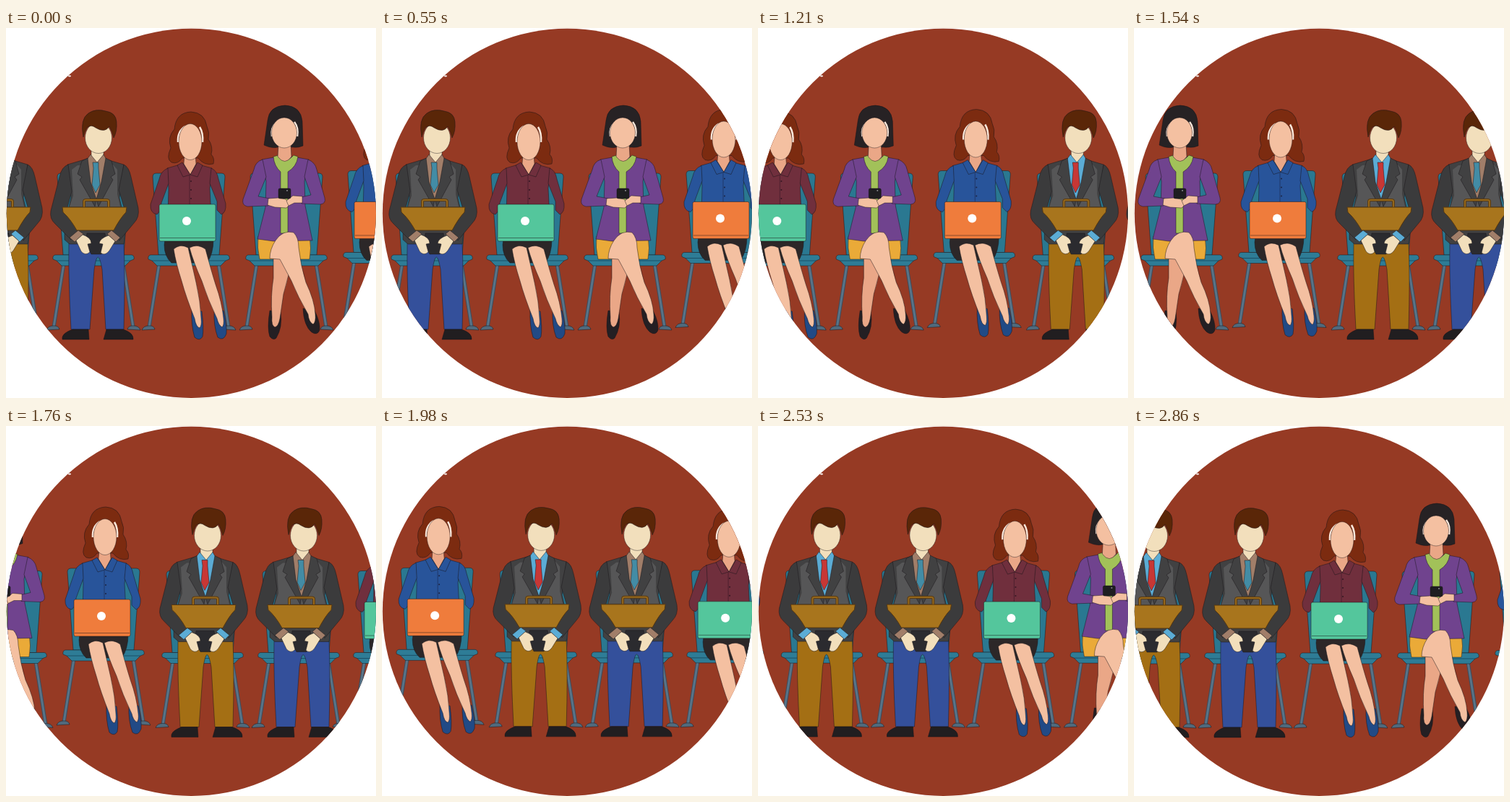
Recreate the animation shown at these times as an HTML page with a canvas. Size 512 by 512 pixels, loop 2970 ms.

```html
<!DOCTYPE html>
<html lang="en">
<head>
<meta charset="utf-8">
<title>Waiting room</title>
<style>
html, body { margin: 0; width: 100%; height: 100%; overflow: hidden; background: #fff; }
canvas { display: block; width: 512px; height: 512px; }
</style>
</head>
<body>
<canvas id="stage" width="512" height="512"></canvas>
<script>
const ctx = document.getElementById('stage').getContext('2d');

const LOOP = 2970, STEP = 110, HOLD_STEPS = 2, ROW_WIDTH = 672;
// [step, distance travelled to the left, vertical drift]
const KEYS = [[0, 0, 0], [3, 52, 0], [7, 161, 0], [12, 322, 0], [14, 388, -0.5], [18, 501, -1.5], [24, 639, 0]];
const LINE = 'rgba(25,20,25,.6)';
const SKIN = '#f4c0a1', SHADE = '#eaa787', PALE = '#f2dfbc', EAR = '#fbe9dc';

function shape(fill, d, line = LINE, width = 0.8) {
  const path = new Path2D(d);
  if (fill) { ctx.fillStyle = fill; ctx.fill(path); }
  if (line) { ctx.strokeStyle = line; ctx.lineWidth = width; ctx.stroke(path); }
}

function oval(fill, x, y, rx, ry, line = LINE) {
  ctx.beginPath();
  ctx.ellipse(x, y, rx, ry, 0, 0, Math.PI * 2);
  ctx.fillStyle = fill;
  ctx.fill();
  if (line) { ctx.strokeStyle = line; ctx.lineWidth = 0.7; ctx.stroke(); }
}

function box(fill, x, y, w, h, r, line = LINE) {
  ctx.beginPath();
  ctx.roundRect(x, y, w, h, r);
  ctx.fillStyle = fill;
  ctx.fill();
  if (line) { ctx.strokeStyle = line; ctx.lineWidth = 0.8; ctx.stroke(); }
}

function chair(cx) {
  ctx.save();
  ctx.translate(cx, 0);
  for (const side of [-1, 1]) {
    ctx.save();
    ctx.scale(side, 1);
    shape(null, 'M41 326 L55 414', '#3d4c5c', 5);
    shape(null, 'M41 326 L55 414', '#587488', 3);
    shape('#506a7d', 'M47 417 Q48 412 55 412 Q63 412 65 418 Z');
    ctx.restore();
  }
  shape('#2a7891', 'M-50 206 Q-50 201 -45 201 L45 201 Q50 201 50 206 L42 314 L-42 314 Z');
  shape('#2e7c96', 'M-53 314 L53 314 Q57 315 56 320 L51 322 L44 329 L-44 329 L-51 322 L-56 320 Q-57 315 -53 314 Z');
  shape(null, 'M-51 322 L51 322', 'rgba(15,50,70,.6)', 1);
  ctx.restore();
}

function man({ shirt, tie, trousers }) {
  chair(-1);
  // trousers and shoes
  shape(trousers, 'M-35 296 L41 296 Q43 345 41 417 L16 417 L11 334 Q5 300 0 334 L-6 417 L-32 417 Q-36 345 -35 296 Z');
  shape('#211e20', 'M-30 417 L-8 417 L-7 431 L-44 431 Q-46 423 -30 417 Z');
  shape('#211e20', 'M17 417 L40 417 Q55 422 54 431 L13 431 Z');

  // jacket
  shape('#414142', 'M-10 181 L-37 189 L-32 235 L-41 275 L-41 293 L-34 299 L41 299 L44 275 L35 235 L41 189 L14 181 Z');
  shape('#565657', 'M-23 190 L-31 196 L-29 232 L-34 247 L36 247 L32 230 L32 196 L26 189 Z', null);
  shape('#3b3b3c', 'M-36 189 Q-45 192 -48 206 L-60 253 Q-62 264 -54 271 L-32 293 L-22 281 L-39 256 L-31 226 Z');
  shape('#3b3b3c', 'M41 189 Q48 192 51 206 L61 249 Q63 262 55 270 L35 294 L25 282 L43 254 L34 224 Z');

  // shirt, tie and lapels
  shape(PALE, 'M-4 164 L13 164 L13 181 L4 189 L-4 181 Z');
  shape(shirt, 'M-5 175 L4 186 L13 175 L17 182 L10 222 L3 238 L-5 222 L-10 182 Z');
  shape(tie, 'M-2 186 L6 186 L6 194 L8 217 L2 228 L-3 217 L-1 194 Z');
  shape('#414142', 'M-9 180 L-17 184 L-23 202 L-17 206 L-20 210 L1 247 L3 237 L-5 213 Z');
  shape('#414142', 'M16 180 L24 184 L29 202 L23 206 L26 210 L6 247 L3 237 L10 213 Z');

  // head
  oval(PALE, 6, 152, 18.5, 21.5);
  shape('#5a2608', 'M-15 151 Q-20 126 -8 118 Q2 111 16 115 Q30 117 31 130 Q32 143 27 152 Q25 143 21 136 Q15 146 2 138 Q-4 133 -10 138 Q-13 143 -15 151 Z');

  // briefcase
  const handle = 'M-14 248 L-14 240 Q-14 238 -11 238 L17 238 Q20 238 20 240 L20 248';
  shape(null, handle, '#5a3b12', 4);
  shape(null, handle, '#94671c', 2);
  shape('#a8751d', 'M-44 248 L45 248 L44 255 Q36 263 27 280 L-24 280 Q-33 264 -43 255 Z', '#573810', 1);

  // lap, cuffs and hands
  shape('#2b2b2f', 'M-10 284 L15 284 L17 299 L10 313 L-4 313 L-12 299 Z');
  shape(shirt, 'M-34 290 L-22 280 L-15 285 L-27 296 Z');
  shape(shirt, 'M36 290 L24 280 L18 285 L30 296 Z');
  shape(PALE, 'M-25 294 L-16 286 Q-4 290 -4 298 L-9 299 L-6 310 Q-12 316 -18 309 Z');
  shape(PALE, 'M29 295 L20 287 Q8 291 7 298 L12 299 L9 311 Q15 316 21 308 Z');
}

function laptopWoman({ blouse, laptop, lift }) {
  const hair = '#7c2b10';
  ctx.save();
  ctx.translate(0, -lift);
  chair(2);
  // skirt, shoes and legs
  shape('#2c2728', 'M-31 292 L36 292 Q36 313 27 325 L-22 325 Q-32 316 -32 300 Z');
  shape('#214a86', 'M6 389 L20 392 Q23 416 21 427 Q17 434 10 428 Q5 412 6 389 Z');
  shape('#214a86', 'M37 390 L50 391 Q55 411 54 423 Q50 434 42 428 Q36 412 37 390 Z');
  shape(SKIN, 'M-19 306 Q-10 298 1 304 Q7 330 12 352 Q18 378 19 402 Q20 412 17 415 Q12 414 10 402 Q-2 372 -8 350 Q-16 325 -19 306 Z');
  shape(SKIN, 'M3 304 Q14 298 25 306 Q33 336 39 355 Q48 380 50 402 Q51 411 48 414 Q43 411 41 402 Q28 375 20 350 Q8 323 3 304 Z');

  // blouse
  shape(blouse, 'M-7 188 L-28 194 L-26 222 L-27 260 L33 260 L31 222 L34 194 L12 188 Z');
  shape(blouse, 'M-27 194 Q-37 198 -39 209 L-51 244 Q-52 256 -42 258 L-37 252 L-36 242 L-26 215 Z');
  shape(blouse, 'M33 194 Q41 197 43 209 L53 243 Q54 255 47 258 L41 252 L41 240 L31 215 Z');
  shape(null, 'M3 204 L3 246', 'rgba(20,10,25,.45)', 0.8);
  for (const y of [212, 224, 236]) oval('rgba(20,10,20,.65)', 5, y, 1, 1, null);

  // hair, face and collar
  shape(hair, 'M5 116 Q-16 117 -18 140 Q-28 151 -23 166 Q-30 181 -22 186 Q-13 189 -7 180 L15 180 Q23 191 36 188 Q38 180 33 175 Q36 164 29 154 Q31 144 27 136 Q24 117 5 116 Z');
  shape(SHADE, 'M-4 174 L11 174 L12 188 L4 203 L-5 188 Z');
  shape(blouse, 'M-7 186 L4 203 L-6 206 L-14 190 Z');
  shape(blouse, 'M14 186 L4 203 L14 206 L21 190 Z');
  shape(null, 'M-13 158 Q-14 143 -3 136 M21 158 Q22 145 17 137', EAR, 2.5);
  oval(SKIN, 4, 157.5, 16, 25);

  // laptop with a plain disc on its lid
  box(laptop, -39, 244, 78, 51, 2);
  shape(null, 'M-38 290.5 L38 290.5', LINE, 0.8);
  oval('#fff', -1, 267, 6, 6, null);
  ctx.restore();
}

function phoneWoman() {
  chair(3);
  // skirt, shoes and back leg
  shape('#eaaa38', 'M-36 288 L35 288 Q38 305 35 320 L-34 320 Q-38 304 -36 288 Z');
  shape('#241f23', 'M-20 391 L-5 393 Q-2 414 -11 429 Q-15 433 -20 427 Q-24 415 -20 391 Z');
  shape('#241f23', 'M26 388 L42 391 Q50 407 49 418 Q46 426 38 421 Q27 412 26 388 Z');
  shape(SHADE, 'M-15 316 L11 310 Q8 340 -1 368 L-6 402 Q-8 413 -13 414 Q-18 412 -17 400 Q-19 370 -15 346 Z');

  // cardigan
  const purple = '#70438e';
  shape(purple, 'M-9 178 L-31 182 L-25 212 L-26 248 L-37 292 L-15 295 L39 294 L29 246 L28 212 L34 182 L12 178 Z');
  shape(purple, 'M-30 182 Q-40 185 -42 196 L-57 237 Q-59 245 -51 247 L-22 246 L-20 236 L-36 233 L-25 206 Z');
  shape(purple, 'M33 182 Q43 186 45 196 L56 235 Q58 243 50 244 L24 243 L24 234 L37 231 L28 206 Z');
  shape('#a2c159', 'M-15 178 L-8 176 Q0 191 13 176 L19 178 Q17 192 5 199 L5 284 L-5 284 L-5 199 Q-14 191 -15 178 Z');

  // front leg
  shape(SKIN, 'M-12 294 Q-2 279 13 283 Q20 290 20 304 Q23 330 30 352 Q42 377 43 396 Q44 407 40 410 Q34 407 33 396 Q19 372 10 350 Q0 331 -6 320 L-20 319 Q-20 306 -12 294 Z');

  // head
  shape('#272224', 'M1 107 Q-21 108 -23 128 L-28 162 Q-17 167 -9 165 L13 165 Q19 166 26 163 L25 129 Q23 108 1 107 Z');
  shape(SHADE, 'M-8 160 L9 160 L10 178 Q1 191 -9 178 Z');
  shape(null, 'M-17 150 Q-19 138 -11 131 M18 150 Q20 138 14 130', EAR, 2.5);
  oval(SKIN, 0, 145, 17.5, 21);

  // hands and phone
  shape(SKIN, 'M-22 236 L-8 235 L2 237 L8 244 L3 249 L-13 248 L-23 245 Z');
  shape(SKIN, 'M25 233 L12 232 L3 239 L6 246 L14 242 L25 242 Z');
  box('#1e1d20', -8, 222, 17, 14, 2);
  oval('#8b8b90', 4, 225, 1, 1, null);
}

const ROW = [
  [122, () => man({ shirt: '#a17e69', tie: '#438ca5', trousers: '#34509b' })],
  [251, () => laptopWoman({ blouse: '#702f3d', laptop: '#54c69c', lift: 0 })],
  [385, phoneWoman],
  [521, () => laptopWoman({ blouse: '#28549a', laptop: '#ef7c3c', lift: 3.5 })],
  [661, () => man({ shirt: '#5bacd5', tie: '#c73735', trousers: '#a46f14' })]
];

function slope(i, column) {
  const a = KEYS[Math.max(0, i - 1)], b = KEYS[Math.min(KEYS.length - 1, i + 1)];
  return (b[column] - a[column]) / (b[0] - a[0]);
}

// Cubic Hermite curve through the key positions
function follow(step, column) {
  let i = 0;
  while (i < KEYS.length - 2 && step > KEYS[i + 1][0]) i++;
  const a = KEYS[i], b = KEYS[i + 1], span = b[0] - a[0];
  const u = (step - a[0]) / span, v = 1 - u;
  return a[column] * v * v * (1 + 2 * u) + b[column] * u * u * (3 - 2 * u)
    + span * u * v * (slope(i, column) * v - slope(i + 1, column) * u);
}

function draw(step) {
  const shift = follow(step, 1), drift = follow(step, 2);
  ctx.fillStyle = '#fff';
  ctx.fillRect(0, 0, 512, 512);
  ctx.save();
  ctx.beginPath();
  ctx.arc(256.4, 256.4, 255.6, 0, Math.PI * 2);
  ctx.clip();
  ctx.fillStyle = '#963a24';
  ctx.fillRect(0, 0, 512, 512);
  for (const [home, person] of ROW) {
    for (const lap of [-1, 0, 1]) {
      const x = home - shift + lap * ROW_WIDTH;
      if (x < -80 || x > 592) continue;
      ctx.save();
      ctx.translate(x, drift);
      person();
      ctx.restore();
    }
  }
  ctx.restore();
  oval('#fff', 88, 66.5, 2, 1, null);
}

let shown = -1;
const start = performance.now();
function tick() {
  const time = (performance.now() - start) % LOOP;
  const step = Math.max(0, Math.floor(time / STEP) - HOLD_STEPS);
  if (step !== shown) draw(shown = step);
  requestAnimationFrame(tick);
}
ctx.lineJoin = 'round';
tick();
</script>
</body>
</html>
```
